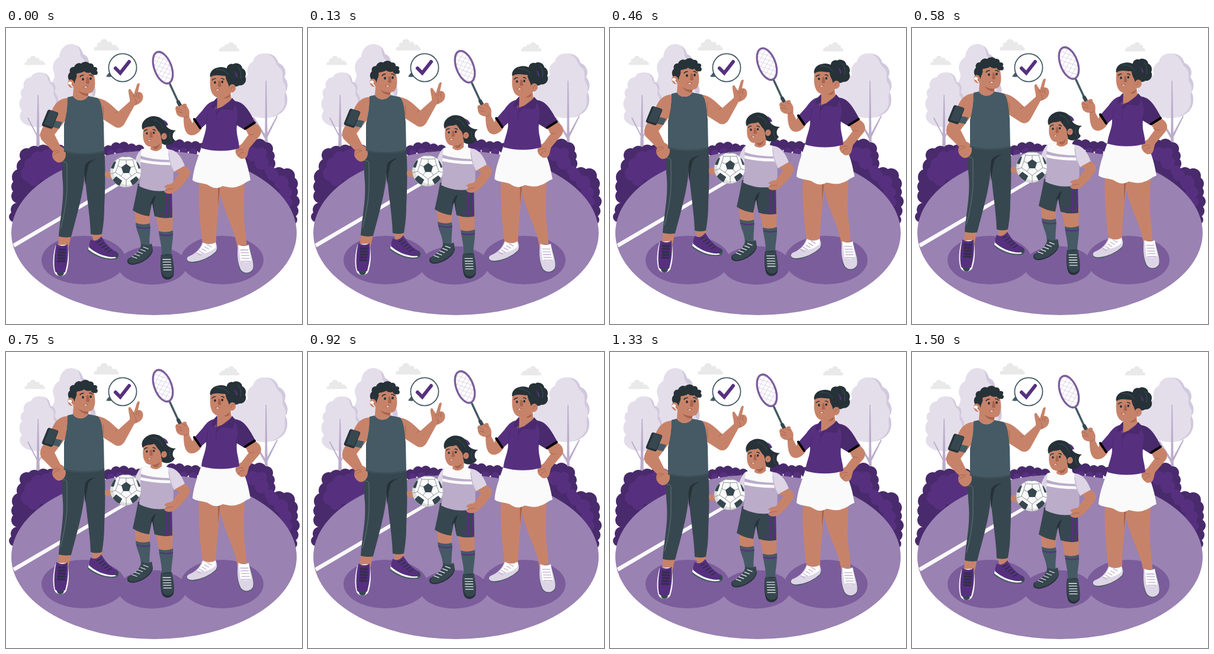
Write an HTML page with a canvas that moves like this. It is 500x500 px and loops after 1.54 s.

```html
<!DOCTYPE html>
<html lang="en">
<head>
<meta charset="utf-8">
<title>Family sport</title>
<style>
html, body { margin: 0; width: 100%; height: 100%; overflow: hidden; background: #fff; }
canvas { display: block; width: 500px; height: 500px; }
</style>
</head>
<body>
<canvas id="stage" width="500" height="500"></canvas>
<script>
const ctx = document.getElementById('stage').getContext('2d');
const LOOP = 1540, FLOAT = 1500, STEPS = 36, LIFT = 10;
const purple = '#56307f', plum = '#492a6c', violet = '#7b5d9b', floor = '#9a82b2', lilac = '#bbacca', mist = '#ddd5e5';
const skin = '#c7836a', skinDark = '#a9644e', ink = '#263238', slate = '#37474f', steel = '#455a64', white = '#fafafa';

const fill = (color, d) => { ctx.fillStyle = color; ctx.fill(new Path2D(d)); };
const line = (color, width, d) => {
  ctx.strokeStyle = color; ctx.lineWidth = width;
  ctx.lineCap = ctx.lineJoin = 'round';
  ctx.stroke(new Path2D(d));
};
const oval = (color, x, y, rx, ry = rx, turn = 0) => {
  ctx.fillStyle = color; ctx.beginPath();
  ctx.ellipse(x, y, rx, ry, turn, 0, 2 * Math.PI); ctx.fill();
};
const puffs = (color, list) => list.forEach(([x, y, r]) => oval(color, x, y, r));
const clipped = (d, paint) => { ctx.save(); ctx.clip(new Path2D(d)); paint(); ctx.restore(); };
const laces = (color, n, x, y, dx, dy, w, h, width = 1.3) => {
  for (let i = 0; i < n; i++) line(color, width, `M${x + i * dx} ${y + i * dy}l${w} ${h}`);
};

function cloud(x, y, s, flip = 1) {
  ctx.save(); ctx.translate(x, y); ctx.scale(s * flip, s);
  fill('#e9e9e9', 'M1 19C-1 15 2 12 6 13C4 7 8 4 11 6C12-2 23-2 24 5C29 3 32 6 32 10C37 8 40 11 39 13C43 13 43 17 42 19Z');
  ctx.restore();
}

function trees() {
  const leaf = '#e4deeb', shade = '#d2c8dd';
  const rear = 'M111 27C122 28 128 35 130 44C139 47 142 57 139 66C148 73 149 82 146 91C153 99 153 112 147 119C151 134 138 148 121 151C94 149 74 135 80 119C84 111 75 106 77 96C79 87 84 84 81 75C76 64 82 53 90 49C91 36 99 27 111 27Z';
  fill(leaf, rear);
  clipped(rear, () => fill(shade, 'M118 27C129 38 121 45 132 54C142 65 131 72 140 81C146 93 140 100 146 112C146 130 134 139 120 152L160 150V20Z'));

  const left = 'M57 75C68 75 74 81 75 91C83 92 86 101 82 108C88 115 90 123 86 130C92 145 87 158 75 164C62 169 44 169 33 163C22 157 21 147 27 140C21 133 21 122 27 117C23 111 24 104 30 101C28 91 33 84 42 83C45 77 50 75 57 75Z';
  fill(leaf, left);
  clipped(left, () => fill(shade, 'M62 75C74 82 69 89 76 95C85 103 77 109 82 116C89 126 80 134 85 142C87 154 77 162 63 169L95 169V75Z'));
  fill(lilac, 'M53.5 113L55 113L57 205H51Z');
  line(lilac, 1.8, 'M37 152L54 185M76 149L56 183');

  const far = 'M380 77C395 75 402 79 405 87C412 91 414 98 411 105C418 113 418 130 410 137C404 144 393 146 382 144Z';
  fill(leaf, far);
  clipped(far, () => fill(shade, 'M399 79C407 91 402 97 408 105C415 119 406 130 392 146L420 145V78Z'));

  const right = 'M435 43C449 42 458 49 460 59C470 63 475 73 470 83C477 91 477 102 472 108C479 121 474 139 462 145C449 154 428 154 415 148C404 143 401 132 405 123C397 116 396 104 403 99C398 91 402 82 409 79C405 69 410 60 417 57C419 48 426 43 435 43Z';
  fill(leaf, right);
  clipped(right, () => fill(shade, 'M441 43C457 51 453 58 461 66C472 75 464 84 469 92C477 104 468 111 471 121C472 138 461 145 446 152L480 153V40Z'));
  fill(lilac, 'M438.5 89L440 89L442 199H437Z');
  fill(lilac, 'M417 151L418.5 150L439 182V190Z M459 149L457.5 148L440 180V188Z');
}

function bushes() {
  puffs(plum, [[14, 319, 9], [20, 307, 12], [21, 284, 12], [21, 268, 12], [24, 252, 14], [32, 234, 14],
    [35, 215, 12], [48, 211, 12], [63, 208, 11], [76, 207, 10], [90, 208, 11]]);
  fill(plum, 'M20 318L28 240L45 215H100V260Z');
  puffs(purple, [[38, 246, 13], [43, 231, 12], [54, 220, 12], [69, 216, 11], [82, 211, 12], [62, 239, 18], [80, 230, 18], [47, 257, 10]]);
  puffs(plum, [[173, 207, 9], [186, 202, 9], [199, 201, 9], [212, 204, 9], [225, 206, 9], [280, 198, 10], [293, 197, 9], [307, 200, 9], [320, 200, 9], [331, 203, 9]]);
  puffs(purple, [[177, 211, 6], [192, 210, 7], [207, 211, 6], [221, 212, 6], [285, 208, 7], [300, 209, 7], [316, 210, 7]]);
  puffs(plum, [[413, 200, 12], [428, 199, 12], [440, 204, 11], [444, 216, 10], [444, 229, 11], [461, 247, 12], [475, 250, 13],
    [481, 263, 12], [482, 277, 11], [485, 293, 11], [483, 309, 11], [484, 324, 8]]);
  fill(plum, 'M400 200H440L450 235L478 250L486 327L410 255Z');
  puffs(purple, [[417, 213, 12], [432, 211, 9], [432, 227, 12], [451, 249, 10], [465, 261, 12], [472, 278, 11], [475, 294, 9], [446, 241, 9]]);
}

function scenery() {
  ctx.fillStyle = '#fff'; ctx.fillRect(0, 0, 500, 500);
  cloud(31, 47, 0.82); cloud(148, 19, 1); cloud(394.5, 24, 0.81, -1);
  trees(); bushes();
  oval(floor, 250, 346, 241, 139);
  fill(white, 'M11.5 364.5L194 258L205 258L14.5 370.5Z');
  oval(violet, 131, 392, 71, 41);
  oval(violet, 247, 401, 58, 32.5);
  oval(violet, 365, 392, 70, 41);

  fill(steel, 'M175 74L169 82Q176 84 183 81Z');
  oval(steel, 197, 67, 24.5);
  oval('#fff', 197, 67, 22.7);
  ctx.save();
  ctx.strokeStyle = purple; ctx.lineWidth = 6; ctx.lineCap = 'round'; ctx.lineJoin = 'miter';
  ctx.stroke(new Path2D('M185 68L193 76L208 57'));
  ctx.restore();
}

function face(x, y, s) {
  ctx.save(); ctx.translate(x, y); ctx.scale(s, s);
  oval(ink, 0, 0, 1.9, 2.3); oval(ink, 13, -1, 1.9, 2.3);
  line(ink, 1.5, 'M-5-4Q-3-7 1-7M11-7Q14-8 16-5');
  fill(skinDark, 'M6-3Q9-5 10-1L11 7Q8 9 5 7Z');
  fill('#fff', 'M2 12.5Q5 11 7 12Q6 14 3.5 14Z');
  line('#8c4938', 0.9, 'M1 13Q5 10.5 8 12');
  ctx.restore();
}

function father() {
  // feet
  fill(skin, 'M90 346H111L105 374H87Z M143 343H162L163 361L149 364Z');
  fill(white, 'M84 367C79 383 78 401 82 413C86 421 98 421 102 413C107 398 107 381 104 366Z');
  fill(purple, 'M85 365C92 369 99 369 104 365C106 381 104 398 100 412C95 416 87 416 83 411C80 397 82 379 85 365Z');
  fill(slate, 'M86 414Q92 411 98 414Q97 419 92 419Q87 419 86 414Z');
  fill(plum, 'M88 370Q95 373 102 369L100 396H87Z');
  laces(ink, 5, 88, 374, -0.3, 5, 13, 0.5, 1.5);
  fill(steel, 'M140 368L138 376C151 387 169 393 184 391C191 390 192 384 188 379Z');
  fill(white, 'M140 367L139 374C153 385 169 391 183 389C189 388 190 383 187 379Z');
  fill(purple, 'M143 357C151 362 157 357 161 352C169 366 178 374 188 379C190 384 187 387 181 387C166 387 149 379 140 370C140 365 142 361 143 357Z');
  oval(slate, 187, 384, 2.5, 4, 0.5);
  laces(ink, 5, 153, 363, 4.5, 4, 7, -4, 1.5);

  // trousers
  fill(slate, 'M97 206H166C168 229 168 269 166 303C166 322 164 336 162 348Q152 351 143 348C142 316 136 286 133 246C131 279 119 318 110 353Q99 355 89 352C92 316 98 293 96 261C94 238 94 222 97 206Z');
  fill(ink, 'M153 221Q139 223 134 231Q131 246 134 266Q136 242 140 230Q145 224 153 221Z');
  line('#62717a', 1, 'M96 226Q104 224 103 234L103 275Q101 307 92 339');

  // arms
  fill(skin, 'M105 118C90 119 82 127 77 141L60 172C57 178 57 184 60 189L80 209C75 215 80 224 87 227C94 229 101 222 101 214C101 206 97 201 92 200L82 180L101 155Z');
  line(skinDark, 1, 'M78 210Q84 205 90 208M79 216Q86 209 90 210');
  fill(steel, 'M81 156L95 159L90 170L77 167Z');
  fill(ink, 'M73 138L86 142Q89 143 88 146L79 168Q78 171 75 170L63 166Q60 165 61 162L70 140Q71 138 73 138Z');
  fill(slate, 'M74 139L86 143Q88 144 87 146L78 167L64 163Z');
  fill(skin, 'M153 118C172 121 179 132 190 141L209 124C210 119 206 110 207 104Q210 101 212 106L216 112L221 96Q223 92 226 94L223 108C230 107 233 114 231 120C230 125 224 129 217 131L200 162C195 169 190 170 184 167L162 153Z');
  line(skinDark, 1, 'M215 112L217 117M222 109Q219 112 220 116M226 110Q222 114 225 118M218 120Q222 125 219 129M164 132Q166 145 163 151M188 141L184 144');

  // vest
  fill(steel, 'M104 117L113 115C119 124 131 125 139 115L154 118C162 122 163 142 165 160L166 209C146 215 118 215 98 209L98 163C102 148 104 133 104 117Z');
  line(slate, 1, 'M98 208Q132 217 166 208');

  // head
  fill(skin, 'M115 88L113 115C118 124 132 125 139 115L138 101Z');
  fill(skinDark, 'M122 105Q130 112 140 109L138 115Q126 114 122 105Z');
  fill(skin, 'M114 77C121 67 141 66 148 76C152 91 151 102 146 108C139 113 125 110 117 101Z');
  fill(ink, 'M107 89C103 83 105 77 108 75C106 69 111 65 115 66C117 60 123 58 127 60C131 56 138 56 141 60C145 59 149 62 148 66C153 65 156 69 153 72C157 75 154 81 150 79C147 80 144 78 143 75C138 77 134 75 132 73C127 77 122 75 119 78C121 84 116 87 116 94Z');
  oval(skin, 110, 94, 5.5, 7, -0.3);
  line(skinDark, 1, 'M108 92Q112 93 112 98');
  oval('#fff', 108, 93, 3.2, 2.5); line('#fff', 1.8, 'M109 95L112 99');
  face(130, 86.5, 1);
}

function racket() {
  ctx.save(); ctx.translate(265, 67); ctx.rotate(-0.36);
  ctx.save();
  ctx.beginPath(); ctx.ellipse(0, 0, 14, 27.5, 0, 0, 2 * Math.PI); ctx.clip();
  for (let k = -36; k <= 36; k += 9) {
    line(mist, 1, `M-16 ${k - 13}L16 ${k + 13}M-16 ${k + 13}L16 ${k - 13}`);
  }
  ctx.restore();
  ctx.strokeStyle = violet; ctx.lineWidth = 3.3;
  ctx.beginPath(); ctx.ellipse(0, 0, 14.5, 28, 0, 0, 2 * Math.PI); ctx.stroke();
  ctx.restore();
  line(steel, 3.5, 'M277 95L290 123');
  line(slate, 6, 'M291 125L304 149');
  line(steel, 3, 'M302 151L306 149');
}

function mother() {
  // legs and shoes
  fill(skin, 'M326 257L362 264C362 292 355 321 355 366Q344 371 332 365C329 336 324 302 326 257Z M358 260H403C402 292 400 314 404 339L407 372H391C386 334 367 317 358 260Z');
  fill(skinDark, 'M358 266L362 267L358 300Z');
  fill(steel, 'M306 387C302 395 312 398 322 396C338 391 351 384 357 376L355 366Z');
  fill(mist, 'M332 362Q343 368 354 362Q358 370 355 377C345 387 329 394 315 395C306 395 303 390 308 386C319 382 328 374 332 362Z');
  fill('#fff', 'M333 363Q344 368 354 363L354 371C345 379 333 383 322 379Q330 373 333 363Z');
  laces(lilac, 5, 322, 380, 4.5, -3.5, 7, 4);
  fill(steel, 'M392 368C391 386 391 399 395 408C399 416 412 417 417 409C421 397 414 381 410 367Z');
  fill(mist, 'M392 366Q401 370 410 366C413 382 420 397 417 407C412 416 400 415 396 407C391 396 390 381 392 366Z');
  fill('#fff', 'M393 367Q402 371 410 367L414 393Q405 398 396 393Z');
  laces(lilac, 5, 396, 375, 0.7, 4.7, 13, 0);

  // skirt
  fill(white, 'M330 201C351 207 374 207 394 201C406 218 410 241 413 257C403 261 399 266 393 267C382 272 374 268 366 267C356 273 348 270 341 265C332 261 323 263 315 257C317 235 325 218 330 201Z');

  // arms
  racket();
  fill(skin, 'M317 155L331 169C324 181 314 184 307 179C301 174 300 162 300 151C291 151 287 145 287 140C285 134 287 130 293 132L300 128Q306 127 305 131L309 138C311 144 308 149 311 153L315 161Z');
  line(skinDark, 1, 'M288 135L297 139M289 141L298 143M299 132L304 135M301 151Q306 151 308 147');
  fill(skin, 'M404 171L419 160C431 165 434 175 428 183L411 203C408 210 409 217 404 220C400 221 397 222 394 219C387 214 386 207 390 201L398 196L410 180Z');
  line(skinDark, 1, 'M389 210Q394 204 401 206M393 216Q396 209 402 210M408 178Q412 181 418 180');

  // shirt
  fill(purple, 'M353 123C343 124 337 132 332 139L317 156L328 171L338 162C339 176 331 188 330 203C351 209 375 209 394 203C394 189 388 181 390 163L403 172L421 159C412 143 404 126 389 124L376 119Z');
  fill(plum, 'M387 129C394 141 391 155 388 163L403 172L421 159C412 143 403 128 389 124Z');
  line('#000', 4, 'M318 154L328 169M404 170L420 160');
  fill(skin, 'M359 109L354 137L365 133L381 121L379 106Z');
  fill(skinDark, 'M363 113Q370 117 379 109L377 117Q369 122 363 113Z');
  fill(plum, 'M357 117Q347 126 347 136L355 132L355 143L361 136Q375 130 382 118L388 125L383 139L364 137L356 146Z');
  line(plum, 1, 'M355 143V157M341 143L338 162');

  // head
  fill(ink, 'M373 70C372 63 379 59 384 61C390 57 399 62 399 68C406 71 406 79 404 82C408 90 402 98 394 97C386 102 378 96 377 91Z');
  fill(skin, 'M346 78C356 71 375 75 380 92L382 106C377 116 366 121 356 117C345 113 343 97 346 78Z');
  fill(ink, 'M345 83C343 76 349 68 357 67C367 64 376 68 381 75C386 83 384 91 381 99L377 101C376 92 371 89 371 81C364 81 353 77 345 83Z');
  oval(skin, 382, 102, 6, 7, 0.3);
  line(skinDark, 1, 'M380 104Q381 98 385 99');
  fill(purple, 'M384 72Q391 75 391 84L388 82Q388 76 384 72Z');
  line(steel, 0.8, 'M355 70Q369 69 376 79M392 66Q399 73 396 85');
  face(353, 92, 0.95);
}

function ball() {
  const x = 202, y = 243, r = 26;
  const corners = [0, 1, 2, 3, 4].map(k => (-90 + 72 * k) * Math.PI / 180);
  const at = (a, d) => `${203 + d * Math.cos(a)} ${238 + d * Math.sin(a)}`;
  ctx.save();
  ctx.beginPath(); ctx.arc(x, y, r, 0, 2 * Math.PI); ctx.clip();
  oval('#dedede', x, y, r);
  oval(white, x + 4, y - 3, r - 1);
  for (const a of corners) {
    const middle = a + Math.PI / 5;
    line('#8b959a', 1, `M${at(a, 8)}L${at(a, 15)}L${at(middle, 19)}L${at(a + 0.4 * Math.PI, 15)}M${at(middle, 19)}L${at(middle, 33)}`);
    fill(slate, `M${at(a - 0.3, 21)}L${at(a + 0.3, 21)}L${at(a + 0.24, 34)}L${at(a - 0.24, 34)}Z`);
  }
  fill(slate, `M${corners.map(a => at(a, 8.5)).join('L')}Z`);
  ctx.restore();
  line('#b8bec1', 0.7, `M${x - r} ${y}a${r} ${r} 0 1 0 ${2 * r} 0a${r} ${r} 0 1 0 ${-2 * r} 0`);
}

function daughter() {
  // legs, socks and shoes
  fill(skin, 'M217 304L244 311L242 334H220Z M252 312H282L281 347H259Z');
  fill(steel, 'M219 329Q231 334 243 330C245 343 241 354 243 370H228C228 352 220 345 219 329Z M258 343Q270 347 282 342C283 356 279 370 279 387H263C264 368 259 357 258 343Z');
  line(purple, 2.2, 'M221 336Q232 340 243 337M260 349Q271 352 281 349');
  fill(ink, 'M206 390C202 398 210 402 220 399C235 395 247 385 248 375L246 366Z M262 383C260 398 261 412 264 420C268 427 279 427 283 418C285 406 282 393 280 382Z');
  fill(slate, 'M229 364Q238 369 246 364C249 373 247 380 241 385C233 393 222 398 213 398C205 397 205 391 210 388C221 382 227 374 229 364Z M263 382Q271 386 280 382C282 395 284 408 282 416C278 423 268 422 265 416C261 407 261 395 263 382Z');
  laces('#e9edef', 5, 213, 386, 4.8, -4, 8, 3);
  laces('#e9edef', 5, 265, 391, 0.3, 4.4, 13, 0);

  // shorts
  fill(slate, 'M223 263H280L281 320Q266 323 251 318L247 294L242 318Q226 316 214 308C218 290 221 276 223 263Z');
  fill(ink, 'M253 283Q246 286 243 301L247 296L251 318L249 296Z');
  line(purple, 2, 'M271 279L271 319M278 276L278 319M260 313H268');

  // shirt
  fill(mist, 'M230 204C224 208 219 218 217 229L228 241Z');
  fill(skin, 'M177 241Q172 244 168 242Q166 247 168 252L178 254Z');
  const shirt = 'M229 205Q245 199 262 202L275 205C283 218 284 243 282 272C263 278 242 276 225 267C229 246 225 223 229 205Z';
  fill(lilac, shirt);
  clipped(shirt, () => {
    fill(white, 'M225 200H284V223Q250 224 225 215Z');
    line(white, 5, 'M224 223Q249 230 284 229');
  });
  fill(mist, 'M274 205C288 205 297 219 302 233Q295 240 284 243C277 233 274 220 274 205Z');
  line(lilac, 1, 'M275 212Q277 231 283 241');
  fill(skin, 'M285 242L301 233C310 237 313 243 309 250C303 260 296 269 285 277C280 281 270 281 267 276Q269 274 271 271L267 268Q271 264 280 263L293 246Z');
  line(skinDark, 1, 'M269 274Q277 271 282 272');

  // head
  fill(ink, 'M264 158C271 167 276 173 287 173Q280 177 282 186L285 190C280 199 269 199 263 195Z');
  fill(skin, 'M246 192L244 205Q254 212 263 203L264 187Z');
  fill(skinDark, 'M246 200Q255 202 260 195Q259 204 252 205Z');
  fill(skin, 'M233 167C241 159 256 162 262 176L263 188C260 197 250 202 241 200C232 197 229 183 233 167Z');
  fill(ink, 'M231 172C226 161 235 151 247 149C261 148 271 157 272 171C273 179 270 188 264 194C261 187 263 181 259 176C255 172 253 167 250 165C243 168 236 165 231 172Z');
  oval(skin, 267, 183, 4.7, 5.5, 0.2);
  line(skinDark, 0.9, 'M266 185Q266 180 270 181');
  fill(purple, 'M265 155Q272 157 274 164L270 165Q269 159 265 155Z');
  line(steel, 0.7, 'M249 155Q260 156 265 168M277 176Q274 185 280 192');
  face(238, 178, 0.9);
  ball();
}

function draw(now) {
  const time = now % LOOP;
  const step = Math.min(STEPS, Math.floor((time + 4) * STEPS / FLOAT));
  const lift = LIFT * (1 - Math.abs(1 - 2 * step / STEPS));
  scenery();
  ctx.save();
  ctx.translate(0, -lift);
  father(); mother(); daughter();
  ctx.restore();
}

const start = performance.now();
function tick() {
  draw(performance.now() - start);
  requestAnimationFrame(tick);
}
tick();
</script>
</body>
</html>
```
